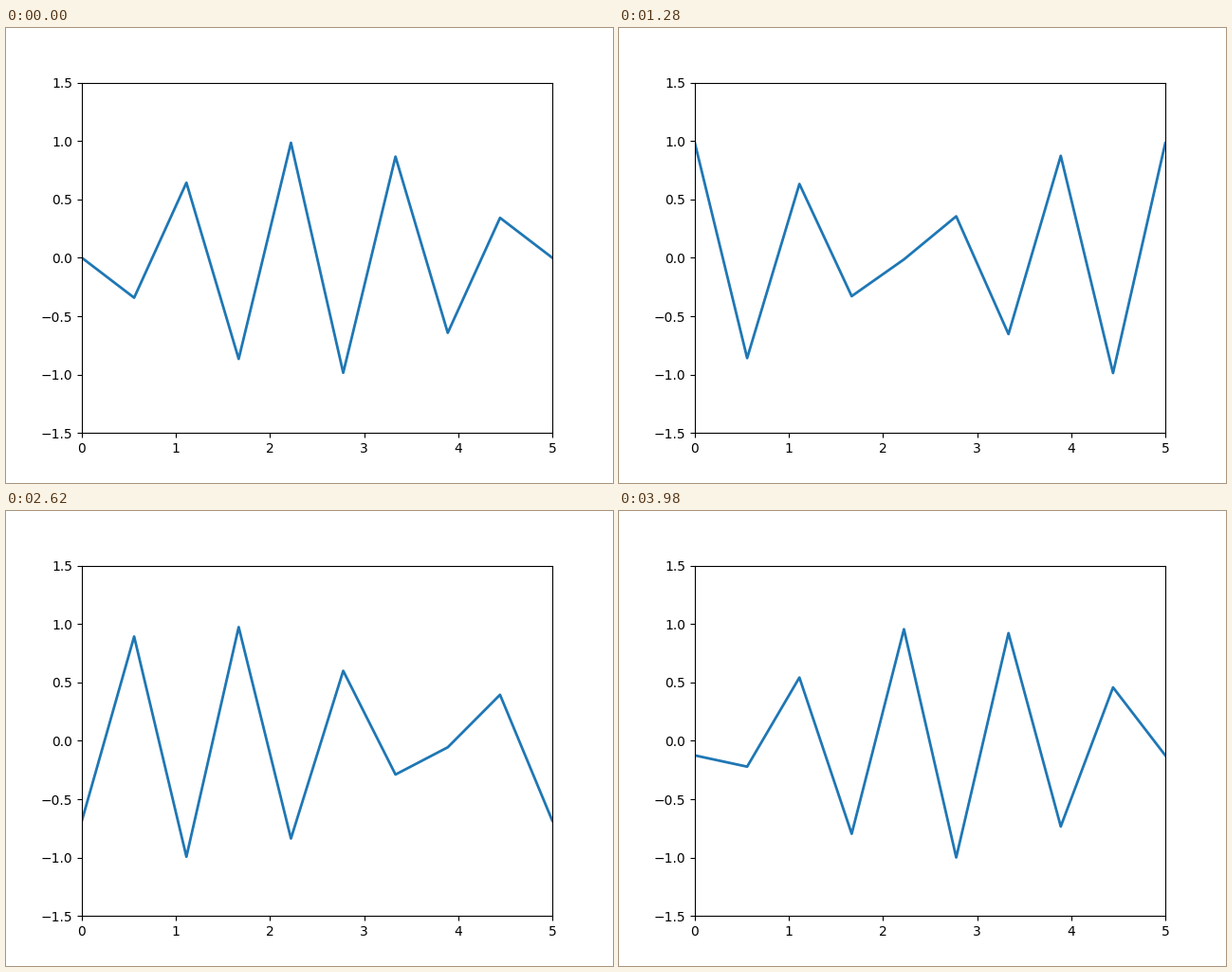
Write a matplotlib script that moves like this. It is 640x480 px and loops after 4 s.

```python
import numpy as np
import matplotlib.pyplot as plt
from matplotlib.animation import FuncAnimation

FRAMES = 200
INTERVAL = 20  # ms
STEP = 0.02    # phase shift per frame, in wavelengths

fig = plt.figure(figsize=(6.4, 4.8), dpi=100)
ax = fig.add_subplot(xlim=(0, 5), ylim=(-1.5, 1.5))
line, = ax.plot([], [], lw=2)

# Ten samples over five wavelengths give the zigzag look.
x = np.linspace(0, 5, 10)


def init():
    line.set_data([], [])
    return line,


def update(i):
    line.set_data(x, np.sin(2 * np.pi * (x + STEP * i)))
    return line,


anim = FuncAnimation(fig, update, frames=FRAMES, init_func=init,
                     interval=INTERVAL, repeat=True, repeat_delay=0, blit=True)

plt.show()
```
